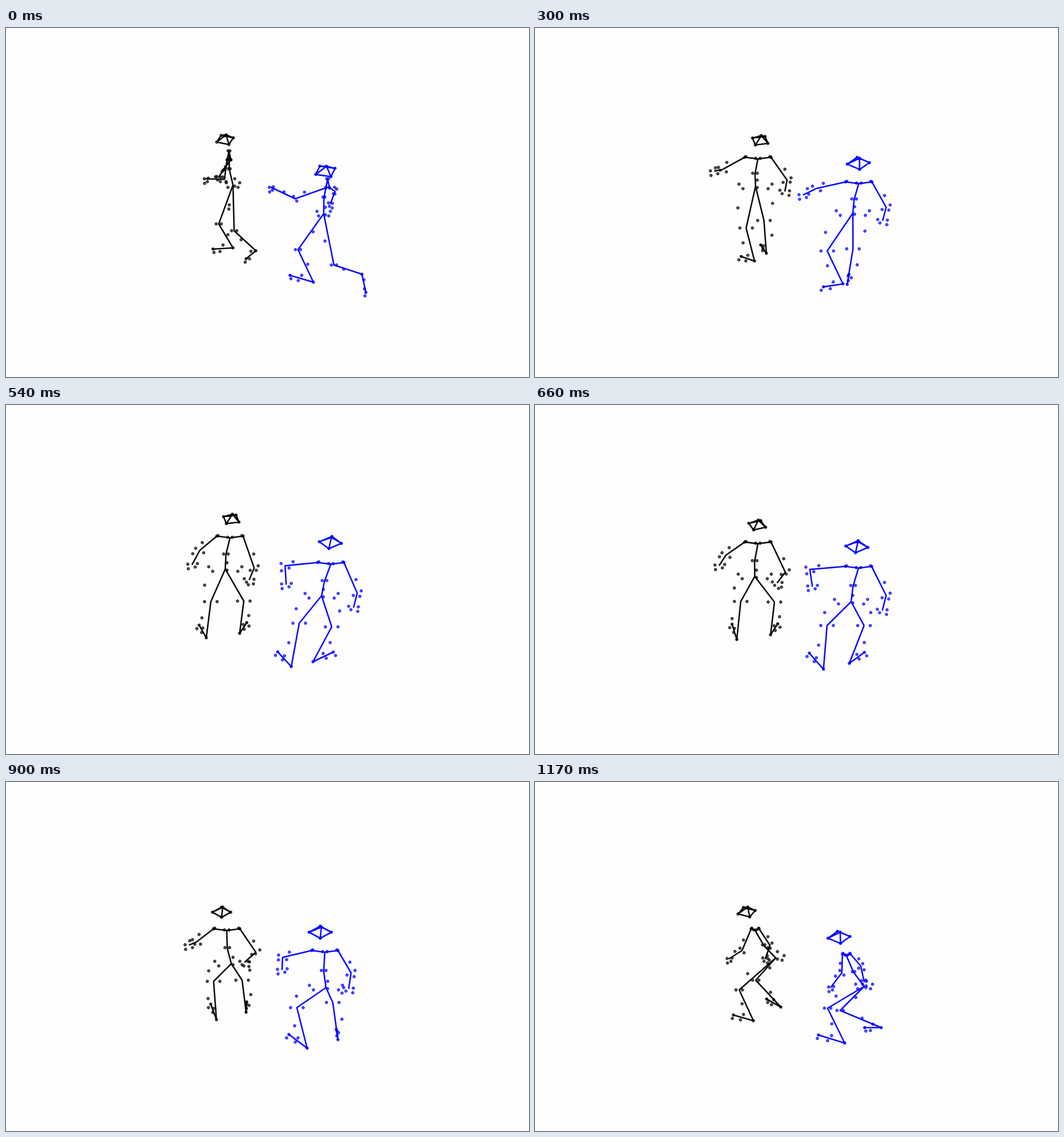
An HTML page that plays this animation: 917 px wide and 611 px high, repeating every 1200 ms.

```html
<!DOCTYPE html>
<html lang="en">
<head>
<meta charset="utf-8">
<title>Two walking figures</title>
<style>
html, body { margin: 0; width: 100%; height: 100%; overflow: hidden; background: #fefefe; }
svg { display: block; width: 100vw; height: 100vh; }
path { fill: none; stroke-width: 2.6; stroke-linejoin: round; stroke-linecap: square; opacity: .95; }
circle { stroke-width: 1; fill-opacity: .7; stroke-opacity: .7; }
</style>
</head>
<body>
<svg id="stage" viewBox="0 0 917 611"></svg>
<script>
const LOOP = 1200, STEP = 30;
const JOINTS = ['head', 'neck', 'hip', 'elbowL', 'handL', 'elbowR', 'handR',
  'kneeL', 'heelL', 'toeL', 'kneeR', 'heelR', 'toeR'];
const CHAINS = [
  'neck spine hip', 'neck shoulderL elbowL handL', 'neck shoulderR elbowR handR',
  'hip kneeL heelL toeL', 'hip kneeR heelR toeR',
  'ring0 ring1 ring2 ring3 ring0', 'ring0 crown ring2', 'ring1 crown ring3'
].map(c => c.split(' '));
const SOLID = ['heelL', 'toeL', 'heelR', 'toeR', 'ring0', 'ring1', 'ring2', 'ring3', 'crown'];

// Markers on one side: bone start, bone end, place along it, outward and downward offset.
const MARKERS = [
  ['neck', 'neck', 0, 4, -1], ['spine', 'spine', 0, 4, -1],
  ['hip', 'hip', 0, 29, -4], ['hip', 'hip', 0, 22, 4],
  ['shoulder', 'shoulder', 0, 0, 0], ['shoulder', 'shoulder', 0, -2, -1],
  ['shoulder', 'elbow', .65, 6, -5], ['elbow', 'elbow', 0, 7, -4], ['elbow', 'elbow', 0, -7, 4],
  ['elbow', 'hand', .4, 7, -4],
  ['hand', 'hand', 0, 8, 0], ['hand', 'hand', 0, 7, 8], ['hand', 'hand', 0, -5, 5], ['hand', 'hand', 0, -9, -1],
  ['hip', 'knee', .6, 21, -6], ['knee', 'knee', 0, 11, 0], ['knee', 'knee', 0, -11, 0],
  ['knee', 'heel', .45, 12, 0],
  ['heel', 'toe', .5, 0, -6], ['heel', 'toe', .65, 0, 5], ['toe', 'toe', 0, 4, 6]
];

const stage = document.getElementById('stage');

function add(tag, attrs) {
  const el = document.createElementNS('http://www.w3.org/2000/svg', tag);
  for (const k in attrs) el.setAttribute(k, attrs[k]);
  return stage.appendChild(el);
}

function figure(color, headSize) {
  return { color, headSize, times: [], poses: [], path: add('path', { stroke: color }), dots: [] };
}

// Key pose: time, head yaw in degrees, then x, y of each joint.
function pose(fig, time, ...values) {
  fig.times.push(time);
  fig.poses.push(values);
}

const black = figure('#000', 16), blue = figure('#00f', 19.5);

pose(black, 0, -25, 384,196, 391,216, 398,275, 383,265, 351,264, 382,247, 373,261,
  400,355, 438,390, 421,404, 373,343, 398,385, 363,387);
pose(black, 180, 20, 391,200, 389,230, 390,277, 328,250, 313,237, 439,256, 435,273,
  381,354, 412,407, 385,408, 390,335, 404,391, 378,381);
pose(black, 420, 35, 397,195, 393,227, 385,279, 340,250, 326,271, 434,277, 429,297,
  362,346, 360,406, 343,390, 411,341, 407,397, 413,380);
pose(black, 900, 0, 378,228, 387,260, 395,318, 334,280, 322,285, 438,298, 419,315,
  364,349, 369,416, 359,389, 414,347, 421,403, 422,385);
pose(black, 1170, -20, 371,228, 386,260, 422,308, 363,295, 341,309, 412,286, 404,309,
  358,364, 383,418, 348,408, 387,347, 431,394, 406,380);

pose(blue, 0, -30, 560,251, 564,265, 557,325, 507,299, 465,279, 577,286, 569,307,
  575,415, 624,431, 631,463, 512,388, 539,445, 498,433);
pose(blue, 180, -18, 563,240, 565,271, 560,323, 495,286, 457,280, 610,303, 604,325,
  519,400, 576,442, 541,467, 546,385, 557,449, 532,431);
pose(blue, 420, 4, 570,237, 570,274, 554,327, 494,279, 488,306, 615,323, 609,346,
  516,383, 510,453, 485,437, 564,389, 535,448, 565,432);
pose(blue, 900, 0, 551,263, 559,298, 561,360, 485,307, 484,328, 605,334, 601,361,
  510,395, 528,466, 496,442, 573,386, 582,451, 579,433);
pose(blue, 1170, -8, 533,272, 546,304, 577,358, 538,334, 519,359, 571,322, 577,349,
  513,396, 543,457, 497,443, 535,400, 607,430, 578,430);

const clamp = u => Math.max(0, Math.min(1, u));
const mix = (a, b, u) => a + (b - a) * u;

// Rate of change of value i at pose k, weighted for uneven spacing.
function slope({ times, poses }, k, i) {
  const rate = n => (poses[n + 1][i] - poses[n][i]) / (times[n + 1] - times[n]);
  const last = times.length - 1;
  if (k === 0) return rate(0);
  if (k === last) return rate(last - 1);
  const before = times[k] - times[k - 1], after = times[k + 1] - times[k];
  return (rate(k - 1) * after + rate(k) * before) / (before + after);
}

function valuesAt(fig, time) {
  const { times, poses } = fig;
  let k = 0;
  while (k < times.length - 2 && time >= times[k + 1]) k++;
  const span = times[k + 1] - times[k];
  const u = (time - times[k]) / span, v = 1 - u;
  return poses[k].map((a, i) =>
    v * v * (1 + 2 * u) * a + u * u * (3 - 2 * u) * poses[k + 1][i] +
    span * u * v * (v * slope(fig, k, i) - u * slope(fig, k + 1, i)));
}

function skeleton(fig, time) {
  const [yaw, ...xy] = valuesAt(fig, time);
  const p = {};
  JOINTS.forEach((name, i) => p[name] = [xy[2 * i], xy[2 * i + 1]]);
  const { head, neck, hip } = p;

  // The trunk opens from profile to back view, then closes again.
  const opened = 1 - (1 - clamp(time / 180)) ** 2;
  const turn = .15 + .85 * opened - .7 * clamp((time - 900) / 270) ** 2;
  p.shoulderL = [neck[0] - 23 * turn, neck[1] - 3 + 18 * (1 - opened)];
  p.shoulderR = [neck[0] + 23 * turn, p.shoulderL[1]];
  p.spine = [mix(neck[0], hip[0], .5) - 3, mix(neck[1], hip[1], .5) + 2];

  for (let k = 0; k < 4; k++) {
    const a = yaw * Math.PI / 180 + k * Math.PI / 2;
    p['ring' + k] = [head[0] - fig.headSize * Math.cos(a), head[1] - fig.headSize * .55 * Math.sin(a)];
  }
  p.crown = [head[0] + 2, head[1] - 9];
  return { p, spread: .3 + .7 * turn };
}

function markers({ p, spread }) {
  const spots = SOLID.map(name => p[name]);
  spots.push([p.hip[0] + 3, p.hip[1] - 11], [p.hip[0] + 3, p.hip[1] + 2]);
  for (const [side, sign] of [['L', -1], ['R', 1]]) {
    const joint = name => p[name + side] || p[name];
    for (const [from, to, u, out, down] of MARKERS) {
      const a = joint(from), b = joint(to);
      spots.push([mix(a[0], b[0], u) + sign * out * spread, mix(a[1], b[1], u) + down]);
    }
  }
  return spots;
}

function draw(time) {
  for (const fig of [black, blue]) {
    const body = skeleton(fig, time);
    const at = name => body.p[name].map(n => n.toFixed(2)).join(' ');
    fig.path.setAttribute('d', CHAINS.map(c => 'M' + c.map(at).join('L')).join(''));
    markers(body).forEach(([x, y], i) => {
      fig.dots[i] ||= add('circle', { r: 2.4, fill: fig.color, stroke: fig.color });
      fig.dots[i].setAttribute('cx', x.toFixed(2));
      fig.dots[i].setAttribute('cy', y.toFixed(2));
    });
  }
}

function tick(now) {
  draw(Math.floor((now % LOOP) / STEP) * STEP);
  requestAnimationFrame(tick);
}
draw(0);
requestAnimationFrame(tick);
</script>
</body>
</html>
```
